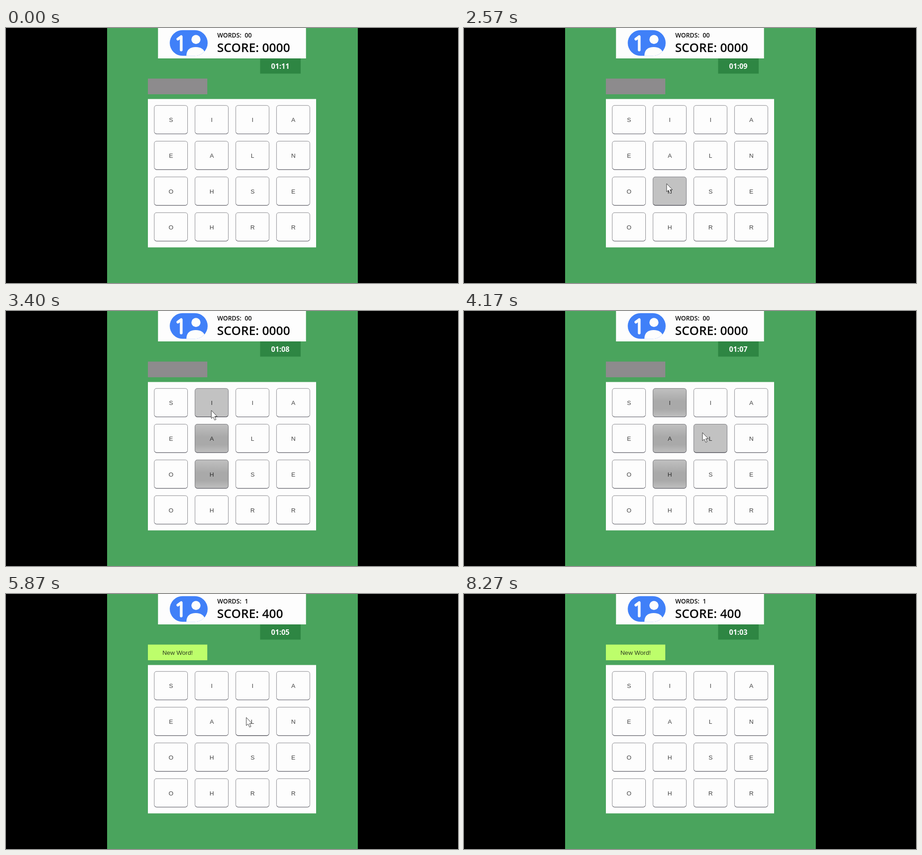
Recreate the animation shown at these times as an HTML page. Size 997 px wide and 562 px high, loop 8.34 s.

```html
<!DOCTYPE html>
<html lang="en">
<head>
<meta charset="utf-8">
<title>Word hunt</title>
<style>
  html, body { margin: 0; width: 100%; height: 100%; overflow: hidden; background: #000; }
  svg { display: block; width: 100%; height: 100%; }
  .head { font-family: "Open Sans", "Noto Sans", sans-serif; font-weight: 600; fill: #0a0a0a; }
  .label { font: 13.4px "Liberation Sans", Arial, sans-serif; text-anchor: middle; fill: #424242; }
  .tile rect { fill: #fdfdfd; stroke: #85858a; }
  .tile path { fill: none; stroke: #62626c; }
  .tile.selected rect { fill: url(#pressed); stroke: #707074; }
  .tile.hover rect { stroke: #76767c; }
  .tile.hover path { stroke: #3c3c46; }
  .tile.selected.hover rect { fill: #c2c2c2; }
  .tile.selected .label { fill: #2b2b2b; }
</style>
</head>
<body>
<svg viewBox="0 0 997 562">
  <defs>
    <linearGradient id="pressed" x1="0" y1="0" x2="0" y2="1">
      <stop offset="0" stop-color="#c0c0c0"/>
      <stop offset=".45" stop-color="#a9a9a9"/>
      <stop offset=".72" stop-color="#a9a9a9"/>
      <stop offset="1" stop-color="#bfbfbf"/>
    </linearGradient>
    <clipPath id="pill"><rect x="361.2" y="4.700" width="83.600" height="56.600" rx="28.300"/></clipPath>
    <clipPath id="field"><rect x="223" width="553" height="562"/></clipPath>
  </defs>
  <rect width="997" height="562"/>
  <rect x="223" width="553" height="562" fill="#4aa45d"/>

  <rect x="335.3" width="326.400" height="67" fill="#fdfdfd"/>
  <g clip-path="url(#pill)">
    <rect x="361" y="4" width="84" height="58" fill="#4080f8"/>
    <path d="M379 24.500L386.500 19V48.500" fill="none" stroke="#fdfdfd" stroke-width="6" stroke-linecap="round" stroke-linejoin="round"/>
    <circle cx="419" cy="25.300" r="10" fill="#fdfdfd"/>
    <path d="M398 62V59C399 47 407 42 418.500 42S437 47 440 57V62Z" fill="#fdfdfd"/>
  </g>
  <g class="head">
    <text x="466" y="20.500" font-size="13.6">WORDS:</text>
    <text id="words" x="526.5" y="20.500" font-size="13.6"></text>
    <text id="score" x="465.5" y="53" font-size="27"></text>
  </g>

  <rect x="560.5" y="67" width="89.500" height="33.500" fill="#2e8643"/>
  <text id="clock" class="head" x="605" y="89.500" font-size="15.8" text-anchor="middle" style="fill:#fdfdfd;font-weight:700"></text>

  <rect id="banner" x="313" y="111.500" width="131" height="34.500"/>
  <text id="message" class="label" x="378.5" y="134" style="font-size:13.6px;fill:#2d3a20">New Word!</text>

  <rect x="313" y="156.500" width="371" height="327" fill="#fdfdfd"/>
  <g id="board"></g>
  <g clip-path="url(#field)">
    <path id="cursor" d="M0 0V18L4 14.500L7.300 21.500L10.300 20L7.200 13.500H12.800Z" fill="#fdfdfd" stroke="#333" stroke-width="1"/>
  </g>
</svg>
<script>
const LOOP = 8340, SUBMIT = 5150;
const LETTERS = "SIIAEALNOHSEOHRR";
const CLICKS = { 9: 2430, 5: 2850, 1: 3270, 6: 4130 };
const TILE = { x: 327, y: 170.7, w: 73.5, h: 62.7, dx: 89.9, dy: 78.75 };

// Pointer stops: time, x, y
const PATH = [
  [1500, 234, 447], [1730, 383, 354], [2200, 447, 343], [2600, 447, 343],
  [2810, 451, 282], [2930, 451, 282], [3230, 453, 219], [3440, 453, 219],
  [4060, 526, 268], [4300, 526, 268], [4700, 530, 272], [6700, 530, 272],
  [7180, 250, 366]
];

const byId = id => document.getElementById(id);

const tiles = [...LETTERS].map((letter, i) => {
  const x = TILE.x + (i % 4) * TILE.dx;
  const y = TILE.y + Math.floor(i / 4) * TILE.dy;
  const { w, h } = TILE;
  const node = document.createElementNS("http://www.w3.org/2000/svg", "g");
  node.innerHTML = `<rect x="${x}" y="${y}" width="${w}" height="${h}" rx="5"/>
    <path d="M${x + 1} ${y + h - 3}Q${x + 2} ${y + h} ${x + 5} ${y + h}H${x + w - 5}Q${x + w - 2} ${y + h} ${x + w - 1} ${y + h - 3}"/>
    <text class="label" x="${x + w / 2 + 0.3}" y="${y + 36.6}">${letter}</text>`;
  byId("board").append(node);
  return { node, x, y };
});

function pointerAt(t) {
  const next = PATH.findIndex(stop => stop[0] > t);
  if (next < 1) return null;
  const [t0, x0, y0] = PATH[next - 1], [t1, x1, y1] = PATH[next];
  const p = (t - t0) / (t1 - t0);
  const leaving = next === PATH.length - 1, entering = next === 1;
  const e = leaving ? p * p : entering ? p : p * p * (3 - 2 * p);
  return [x0 + (x1 - x0) * e, y0 + (y1 - y0) * e];
}

function draw(t) {
  const done = t >= SUBMIT;
  byId("words").textContent = done ? "1" : "00";
  byId("score").textContent = "SCORE: " + (done ? "400" : "0000");
  byId("banner").setAttribute("fill", done ? "#bdfe6b" : "#8d8b8d");
  byId("message").setAttribute("visibility", done ? "visible" : "hidden");

  const seconds = 11 - Math.max(0, Math.floor((t - 570) / 1022) + 1);
  byId("clock").textContent = "01:" + String(seconds).padStart(2, "0");

  const pointer = pointerAt(t);
  byId("cursor").setAttribute("visibility", pointer ? "visible" : "hidden");
  if (pointer) byId("cursor").setAttribute("transform", `translate(${pointer})`);

  tiles.forEach(({ node, x, y }, i) => {
    const hover = pointer && pointer[0] >= x && pointer[0] <= x + TILE.w
      && pointer[1] >= y && pointer[1] <= y + TILE.h;
    const selected = t >= CLICKS[i] && !done;
    node.setAttribute("class", "tile" + (selected ? " selected" : "") + (hover ? " hover" : ""));
  });
}

const start = performance.now();
function frame() {
  draw((performance.now() - start) % LOOP);
  requestAnimationFrame(frame);
}
frame();
</script>
</body>
</html>
```
